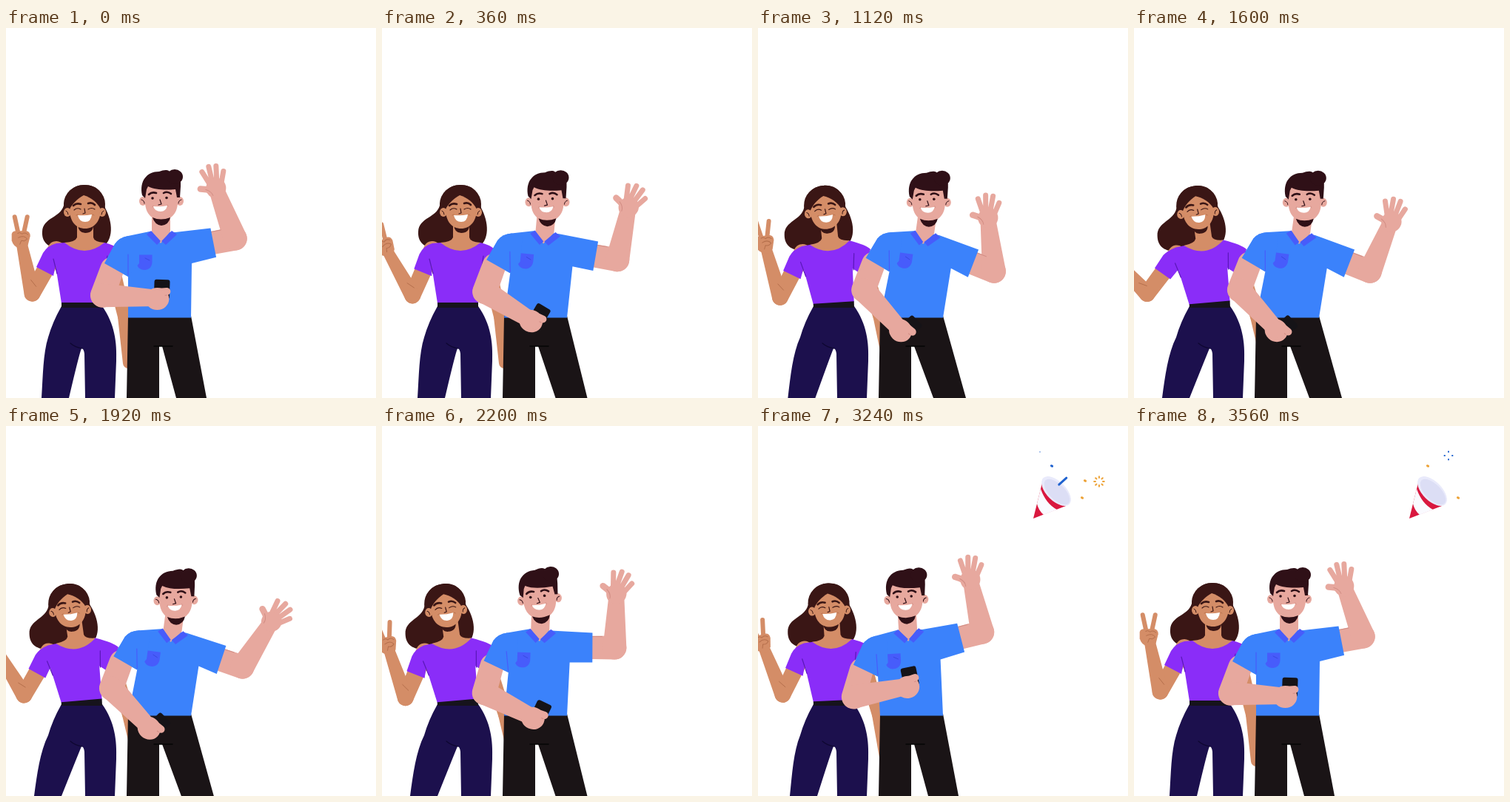
Write an HTML page with a canvas that moves like this. It is 500x500 px and loops after 3.6 s.

```html
<!DOCTYPE html>
<html lang="en">
<head>
<meta charset="utf-8">
<title>Waving friends</title>
<style>
  html, body { margin: 0; width: 100%; height: 100%; overflow: hidden; background: #fff; }
  canvas { display: block; }
</style>
</head>
<body>
<canvas id="stage" width="500" height="500"></canvas>
<script>
const ctx = document.getElementById('stage').getContext('2d');
const LOOP = 3600, STEP = 40;
const man = { skin: '#e7a89e', crease: '#d18c83', hair: '#2f1017', shirt: '#3b82fb', trim: '#475cfb', trousers: '#1a1416' };
const woman = { skin: '#d48d67', crease: '#b56f4c', hair: '#3a1615', shirt: '#8a2df8', trim: '#5a17b8', trousers: '#1c104d' };

// Tracks: alternating time (ms) and value, eased between neighbours.
const tracks = {
  lean: [0, 0, 600, 8, 1850, 8, 2700, -8, 2850, -8, 3560, 0],
  foot: [0, 0, 600, 10, 1850, 10, 2720, 0],
  nod: [0, 0, 1800, 0, 2200, -5, 2720, -5, 3560, 0],
  phoneArm: [0, 20, 1800, 21, 2720, 8, 3560, 20],
  phoneFore: [0, 3, 600, 47, 1850, 47, 2720, -10, 3240, -11, 3560, 3],
  waveArm: [0, -11, 600, 21, 1800, 21, 2580, -19, 2850, -19, 3560, -11],
  waveFore: [0, -21, 660, 37, 1240, -12, 1800, 37, 2520, -23, 2720, -23, 3160, -12, 3560, -21],
  waveHand: [0, 21, 660, 32, 1240, 18, 1600, 1, 1800, 23, 2200, 31, 2720, 11, 3240, 26, 3560, 21],
  sway: [520, 0, 1400, 1, 2920, 1, 3560, 0],
  peaceArm: [0, 29, 680, 19, 1640, 37, 2200, 23, 2720, 20, 3560, 29],
  peaceFore: [0, -12, 680, -44, 1140, -16, 1640, -44, 2200, -19, 2720, -43, 3240, -22, 3560, -12],
  popper: [2440, 0, 2640, 0.9, 2800, 1]
};

const clamp = v => Math.max(0, Math.min(1, v));
const ease = u => u * u * (3 - 2 * u);

function sample(track, t) {
  let value = track[1];
  for (let i = 2; i < track.length; i += 2) {
    const u = ease(clamp((t - track[i - 2]) / (track[i] - track[i - 2])));
    value += (track[i + 1] - track[i - 1]) * u;
  }
  return value;
}

// Point (x, y) from an origin, turned clockwise by deg.
function offset([ox, oy], x, y, deg) {
  const a = deg * Math.PI / 180, c = Math.cos(a), s = Math.sin(a);
  return [ox + x * c - y * s, oy + x * s + y * c];
}
const turner = (cx, cy, deg) => (x, y) => offset([cx, cy], x - cx, y - cy, deg);

function fill(color, path) {
  ctx.fillStyle = color;
  ctx.fill(new Path2D(path));
}

function line(color, width, path) {
  ctx.strokeStyle = color;
  ctx.lineWidth = width;
  ctx.lineCap = ctx.lineJoin = 'round';
  ctx.stroke(new Path2D(path));
}

function oval(color, x, y, rx, ry = rx, deg = 0) {
  ctx.fillStyle = color;
  ctx.beginPath();
  ctx.ellipse(x, y, rx, ry, deg * Math.PI / 180, 0, 7);
  ctx.fill();
}

function limb(color, [x1, y1], r1, [x2, y2], r2) {
  const a = Math.atan2(y2 - y1, x2 - x1), q = Math.PI / 2;
  ctx.fillStyle = color;
  ctx.beginPath();
  ctx.arc(x1, y1, r1, a + q, a + 3 * q);
  ctx.arc(x2, y2, r2, a - q, a + q);
  ctx.fill();
}

// Draws in a frame whose origin sits at (x, y).
function at([x, y], deg, draw, scale = 1) {
  ctx.save();
  ctx.translate(x, y);
  ctx.rotate(deg * Math.PI / 180);
  ctx.scale(scale, scale);
  draw();
  ctx.restore();
}

function womanFace() {
  const { skin, crease, hair } = woman;
  ctx.translate(-106, -265);
  oval(hair, 106, 238, 28, 26);
  oval(skin, 83, 249, 5, 6);
  oval(skin, 130, 249, 5, 6);
  line(hair, 1, 'M81 247Q84 248 84 252M132 247Q129 248 129 252');
  fill(hair, 'M97 266Q106 270 118 266Q118 277 107 277Q98 277 97 266Z');
  fill(skin, 'M86 245C89 238 97 230 105 226C115 229 124 236 128 245C128 261 119 271 107 271C94 271 86 261 86 245Z');
  line(hair, 2.6, 'M91 240Q95 236 101 238M111 237Q116 235 120 239');
  line(hair, 1.1, 'M92 246Q96 242 101 245M111 245Q116 242 120 245');
  line(hair, 1.2, 'M106 244L107 250L104 251');
  line(crease, 0.8, 'M95 253L97 252M117 252L119 253');
  fill('#fff', 'M97 253Q107 254 116 252Q115 262 107 262Q99 262 97 253Z');
}

function womanHair() {
  ctx.translate(-106, -265);
  fill(woman.hair, 'M106 212C88 212 80 225 78 240C73 257 50 256 49 275C48 291 59 297 73 298H128C147 287 144 262 134 243C132 224 125 212 106 212Z');
}

function peaceHand() {
  const { skin, crease } = woman;
  line(skin, 6, 'M-3-6L-8-29M4-6L9-29');
  fill(skin, 'M-12-6Q-11-10-6-10H8Q13-9 13-3L10 9Q6 15-1 14Q-10 11-12 3Z');
  line(crease, 1, 'M-4-7Q-1-9 2-6Q6-9 10-5M-3-1Q5-5 9 1Q5 5 1 3L-1 8');
}

function drawWoman(p) {
  const { skin, crease, shirt, trim, trousers } = woman;
  const s = p.sway, r = turner(102, 375, -8 * s), belt = turner(102, 375, -5 * s);
  const headPos = [106 - 18.5 * s, 265 + s], headTurn = -5 * s;

  at(headPos, headTurn, womanHair);
  const elbow = [160 + 6 * s, 390];
  limb(skin, [143, 320], 10, elbow, 9);
  limb(skin, elbow, 9, [165 + 14 * s, 453], 7);

  fill(trousers, `M75 376H130C147 400 150 425 149 450L147 500H107L106 440Q105 433 102 433Q99 440 ${85 - 10 * s} 500H${48 - 10 * s}C${50 - 8 * s} 470 ${50 - 4 * s} 440 57 418Q63 397 75 376Z`);
  line('#0e0730', 1.2, 'M87 426Q94 432 103 433');

  const shoulder = r(68, 300);
  const arm = p.peaceArm, fore = p.peaceFore;
  const bend = offset(shoulder, 0, 67, arm);
  const hand = offset(bend, 0, -76, fore);
  limb(skin, shoulder, 12, bend, 11);
  limb(skin, bend, 11, hand, 7);
  line(crease, 1, `M${offset(bend, 2, -18, fore)}L${offset(bend, 7, -8, fore)}`);
  at(hand, (fore + 12) * 1.5, peaceHand);

  const cuff = (x, y) => offset(shoulder, x, y, arm - 29);
  fill(shirt, `M${r(80, 290)}L${r(68, 291)}Q${r(56, 294)} ${cuff(-18, 4)}L${cuff(-27, 23)}L${cuff(-4, 35)}L${r(67, 321)}L${belt(75, 372)}L${belt(130, 372)}L${r(133, 328)}L143 335L152 299Q146 293 ${r(133, 290)}Z`);
  line(trim, 1.2, `M${r(64, 312)}L${r(69, 332)}M${r(137, 308)}L${r(134, 330)}`);
  fill('#16131c', `M${belt(75, 371)}L${belt(130, 371)}L130 378H75Z`);

  fill(skin, `M${r(96, 262)}L${r(96, 283)}Q${r(94, 289)} ${r(79, 290)}Q${r(106, 312)} ${r(133, 290)}Q${r(119, 289)} ${r(118, 283)}L${r(118, 262)}Z`);
  at(headPos, headTurn, womanFace);
}

function manHead() {
  const { skin, hair, crease } = man;
  ctx.translate(-208, -262);
  oval(skin, 185, 234, 5, 6);
  oval(skin, 235, 234, 5, 6);
  line(hair, 1, 'M183 232Q187 233 187 237M237 232Q233 233 233 237');
  fill(skin, 'M188 212H232V235C232 251 222 260 210 260C198 260 188 251 188 235Z');
  fill(hair, 'M198 256Q209 261 222 256Q220 266 210 267Q201 266 198 256Z');
  fill(hair, 'M188 230L184 226C180 207 190 194 207 194C212 192 217 191 220 193L236 208V214L235 229L231 229L229 218C215 219 202 219 192 214L190 218Z');
  oval(hair, 228, 201, 11, 10);
  line(hair, 2.6, 'M193 225Q197 221 203 223M213 223Q218 220 223 224');
  oval(hair, 198, 230, 1.8);
  oval(hair, 217, 229.5, 1.8);
  line(hair, 1.2, 'M208 232L210 238L206 239');
  fill('#fff', 'M199 241Q209 242 218 240Q216 248 209 248Q201 248 199 241Z');
  line(crease, 0.8, 'M198 242L199 240M218 239L219 241');
}

function openHand() {
  const { skin, crease } = man;
  line(skin, 7, 'M-8-4L-18-20M-4-6L-9-27M2-6L1-28M8-4L11-21');
  line(skin, 8.5, 'M-3 6Q-12 3-20 3');
  oval(skin, 1, 2, 13.5, 14);
  line(crease, 1, 'M-13 4Q-5 6-3 12');
}

function phoneHand() {
  const { skin, crease } = man;
  at([6, -17], 2, () => {
    ctx.fillStyle = '#151317';
    ctx.beginPath();
    ctx.roundRect(-10, -8, 21, 26, 3);
    ctx.fill();
  });
  oval(skin, 0, 1, 16, 15);
  line(skin, 10, 'M0-8L13-9');
  line(crease, 1, 'M4-3L13-4');
}

function drawMan(p) {
  const { skin, crease, shirt, trim, trousers } = man;
  const r = turner(208, 391, p.lean);
  fill(trousers, `M165 389H250L${271 + p.foot} 500H${230 + p.foot * 0.7}L211 430H207V500H163Z`);
  line('#050405', 1.5, 'M200 430H225');

  // Raised arm
  const shoulder = r(240, 298);
  const elbow = offset(shoulder, 71, 0, p.waveArm);
  const palm = offset(elbow, 0, -75, p.waveFore);
  limb(skin, shoulder, 15, elbow, 16);
  limb(skin, elbow, 16, palm, 10);
  line(crease, 1, `M${offset(elbow, -30, -15, p.waveArm)}L${offset(elbow, -17, -15, p.waveArm)}`);
  at(palm, p.waveFore + p.waveHand, openHand);

  // Shirt
  const top = r(152, 302);
  const cuff = (x, y) => offset(shoulder, x, y, p.waveArm);
  const leftCuff = (x, y) => offset(top, x, y, p.phoneArm - 20);
  const sleeve = `${r(165, 281)}Q${r(153, 283)} ${r(147, 292)}L${leftCuff(-19, 16)}L${leftCuff(13, 34)}`;
  fill(shirt, `M${r(194, 275)}L${sleeve}L165 391.5H250L${r(251, 318)}L${cuff(41, 20)}L${cuff(41, -20)}L${r(229, 276)}Z`);
  at([208, 391], p.lean, () => {
    ctx.translate(-208, -391);
    fill(trim, 'M176.5 306.5H197.5V316C197.5 323 193 327 187 327C181 327 176.5 323 176.5 316Z');
    line('#3346d8', 0.8, 'M188 311L194 314');
    fill(skin, 'M197 250H222V275L209 291L197 275Z');
    fill(trim, 'M190 279L196 274L209 288L204 293ZM231 279L224 274L210 288L216 293Z');
  });
  at([208 + p.lean * 2.6, 262 + Math.abs(p.lean) * 0.22], p.nod, manHead);

  // Arm holding the phone
  const bend = offset(top, 0, 63, p.phoneArm);
  const hand = offset(bend, 74, 0, p.phoneFore);
  limb(skin, offset(top, 0, 25, p.phoneArm), 16, bend, 16.5);
  at(hand, p.phoneFore - 3, phoneHand);
  limb(skin, bend, 16, hand, 11);
  fill(shirt, `M${r(180, 284)}L${sleeve}L${r(180, 318)}Z`);
  line(trim, 1.2, `M${r(165, 306)}L${leftCuff(13, 32)}`);
}

function drawPopper(size) {
  if (size <= 0) return;
  at([372, 125], 0, () => {
    fill('#d9183f', 'M0 0L12-48L44-17Z');
    fill('#fafaff', 'M5-20Q7-11 14-5L32-12Q17-20 10-40Z');
    oval('#e9eafb', 31, -37, 25, 13, 45);
    oval('#dcdef5', 32, -36, 22, 10.5, 45);
  }, size);
}

const BLUE = '#1f62cf', ORANGE = '#eda338';
const rockets = [
  { x: 461, y: 75, color: ORANGE, rays: 8, launch: 2900, burst: 3120 },
  { x: 425, y: 40, color: BLUE, rays: 4, launch: 3200, burst: 3440 }
];
// x, y, colour, first and last time
const specks = [
  [397, 54, BLUE, 3160, 3400], [397, 54, ORANGE, 3400, 3600], [438, 97, ORANGE, 3120, 3600],
  [442, 74, ORANGE, 3160, 3400]
];

function drawConfetti(t) {
  for (const { x, y, color, rays, launch, burst } of rockets) {
    if (t >= launch && t < burst) {
      const u = (t - launch) / (burst - launch);
      const px = 404 + (x - 404) * u * u + 16 * u * (1 - u);
      const py = 87 + (y - 87) * u;
      line(color, 3, `M${px} ${py}l10 -9`);
    } else if (t >= burst && t < burst + 300) {
      const radius = 3 + 4 * clamp((t - burst) / 160);
      for (let i = 0; i < rays; i++) {
        at([x, y], i * 360 / rays, () => line(color, 2, `M${radius - 1} 0h${rays > 4 ? 1.8 : 0.5}`));
      }
    }
  }
  for (const [x, y, color, from, to] of specks) {
    if (t >= from && t < to) oval(color, x, y, 2.2, 1.6, 25);
  }
  if (t >= 3200 && t < 3320) oval(BLUE, 381, 35, 0.7);
}

function frame(now) {
  let t = Math.floor(now % LOOP / STEP) * STEP;
  if (t < 80) t = 0;
  const pose = {};
  for (const name in tracks) pose[name] = sample(tracks[name], t);
  ctx.fillStyle = '#fff';
  ctx.fillRect(0, 0, 500, 500);
  drawWoman(pose);
  drawMan(pose);
  drawPopper(pose.popper);
  drawConfetti(t);
  requestAnimationFrame(frame);
}
requestAnimationFrame(frame);
</script>
</body>
</html>
```
